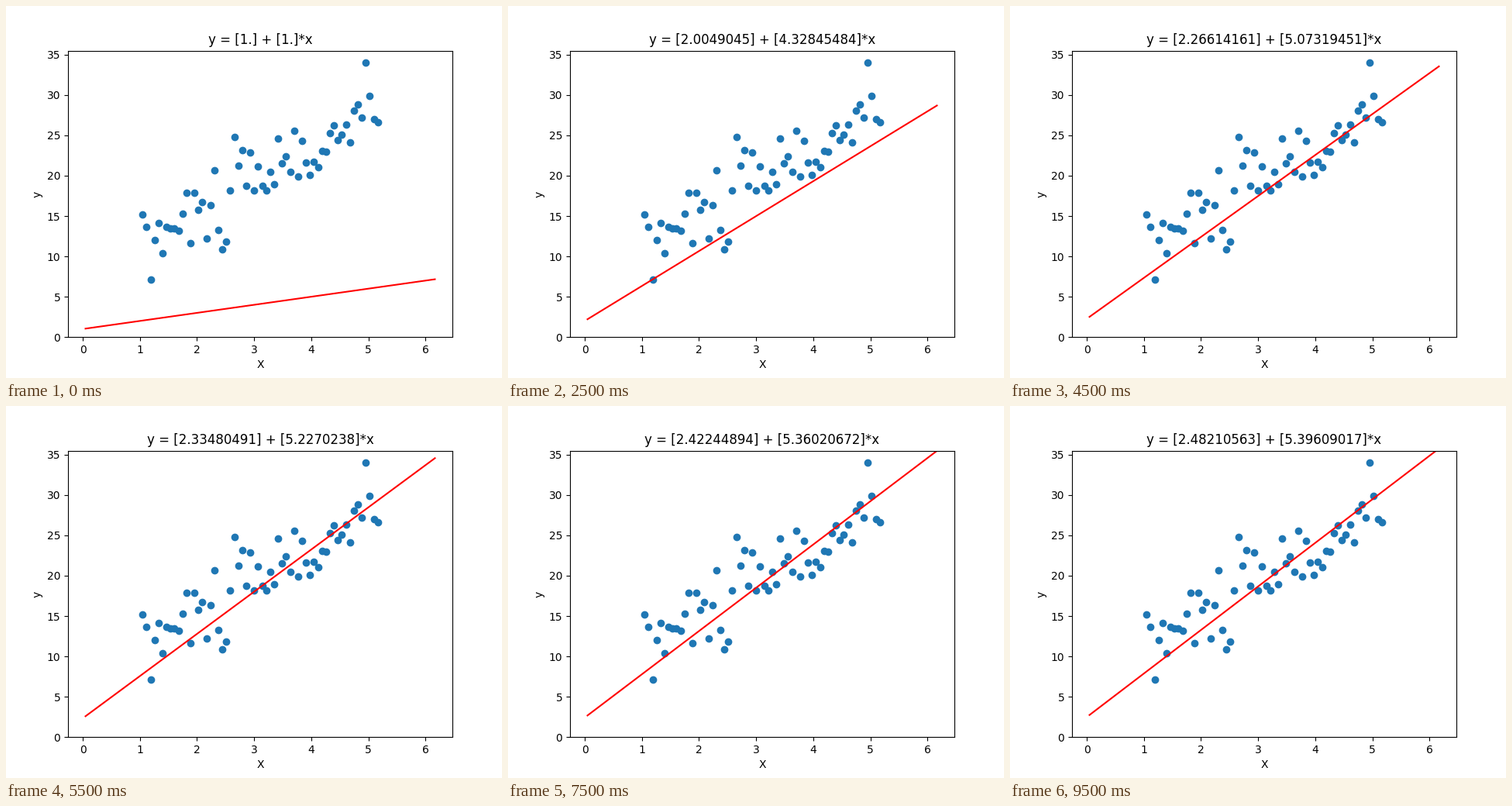
A matplotlib script that plays this animation: 640 by 480 pixels, repeating every 10000 ms.

```python
import numpy as np
import matplotlib.pyplot as plt
from matplotlib.animation import FuncAnimation

FRAMES = 20
INTERVAL = 500
RATE = 0.02

np.random.seed(10)
x = np.radians(np.arange(60, 300, 4))
y = 4 * x + 7 + np.random.normal(0, 3, len(x))


def descend(steps):
    """Intercept and slope after each step of batch gradient descent."""
    intercept, slope = np.array([1.0]), np.array([1.0])
    history = []
    for _ in range(steps):
        history.append((intercept, slope))
        error = y - (intercept + slope * x)
        intercept = intercept + RATE * np.mean(error)
        slope = slope + RATE * np.mean(error * x)
    return history


weights = descend(FRAMES)
line_x = np.array([x[0] - 1, x[-1] + 1])

fig, ax = plt.subplots(figsize=(6.4, 4.8), dpi=100)
ax.scatter(x, y)
line, = ax.plot(line_x, line_x + 1, color="red")
pad = 0.05 * np.ptp(line_x)
ax.set_xlim(line_x[0] - pad, line_x[1] + pad)
ax.set_ylim(0, 35.5)
ax.set_xlabel("X")
ax.set_ylabel("y")
title = ax.set_title("")


def update(frame):
    intercept, slope = weights[frame]
    line.set_ydata(intercept + slope * line_x)
    title.set_text(f"y = {intercept} + {slope}*x")
    return line, title


anim = FuncAnimation(fig, update, frames=FRAMES, interval=INTERVAL,
                     repeat=True, repeat_delay=0, blit=False)
plt.show()
```
